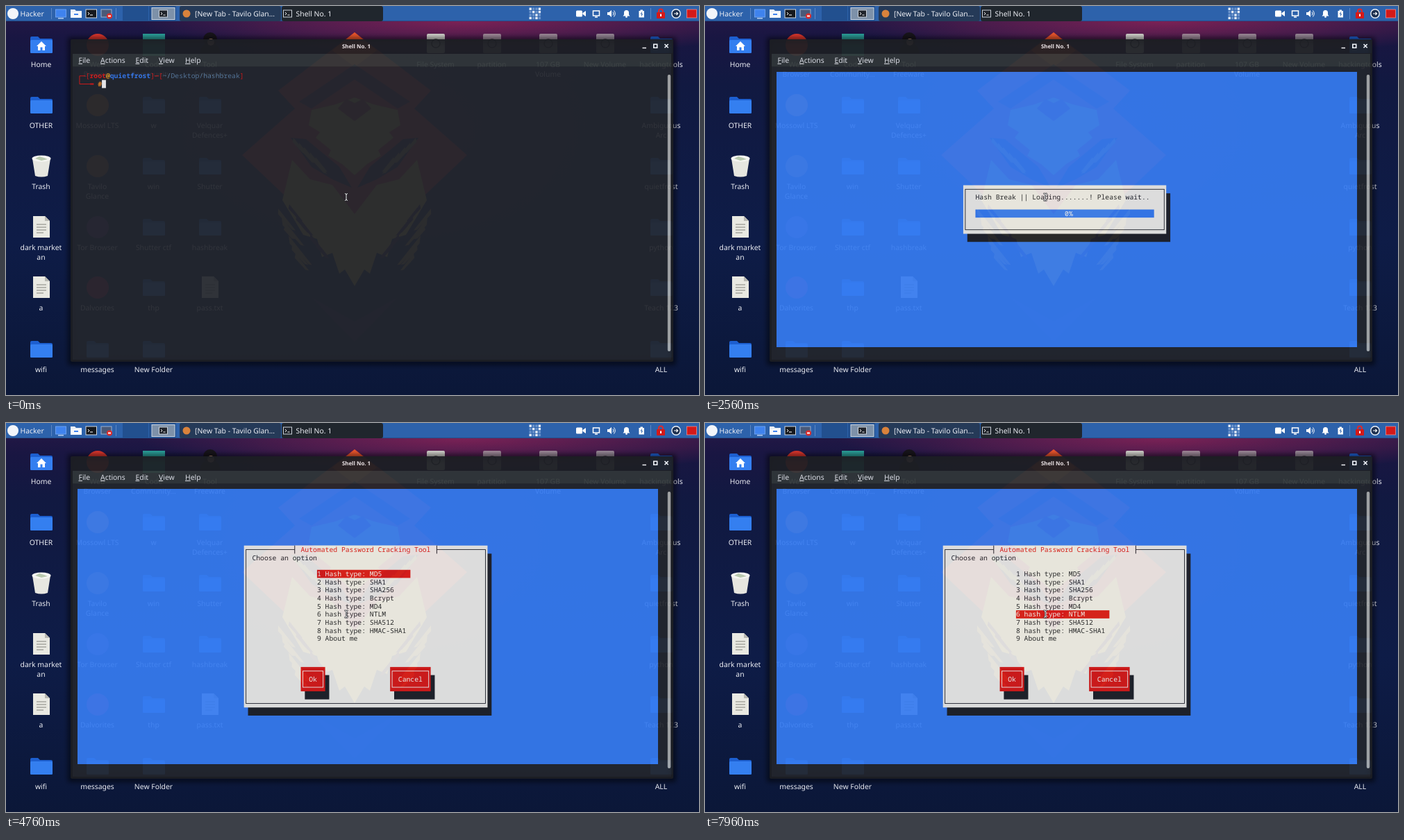
Animation, 998 px wide and 561 px high, one loop 8000 ms. Source, as an HTML page:

```html
<!DOCTYPE html>
<html lang="en">
<head>
<meta charset="utf-8">
<title>Desktop terminal session</title>
<style>
  html, body { margin: 0; width: 100%; height: 100%; overflow: hidden; background: #0c1638; }
  svg { display: block; width: 100vw; height: 100vh; }
  text { font: 10.4px "Noto Sans", sans-serif; fill: #eceef4; text-rendering: geometricPrecision; white-space: pre; }
  .label { text-anchor: middle; }
  .title { font-size: 7.9px; font-weight: 700; text-anchor: middle; }
  .mono { font: 9.743px "Noto Sans Mono", monospace; }
  .bold { font-weight: 700; }
</style>
</head>
<body>
<svg id="stage" viewBox="0 0 998 561">
  <defs>
    <linearGradient id="sky" x2="0" y2="1">
      <stop offset="0" stop-color="#281847"/>
      <stop offset=".08" stop-color="#191642"/>
      <stop offset=".2" stop-color="#111941"/>
      <stop offset=".6" stop-color="#0e1c47"/>
      <stop offset="1" stop-color="#0b1738"/>
    </linearGradient>
    <radialGradient id="glow">
      <stop offset="0" stop-color="#8a2358" stop-opacity=".85"/>
      <stop offset="1" stop-color="#8a2358" stop-opacity="0"/>
    </radialGradient>
    <filter id="blur"><feGaussianBlur stdDeviation="3.5"/></filter>
    <clipPath id="taskClip"><path d="M250 0H396V22H250z"/></clipPath>
    <path id="beam" d="M488.3 270.5Q490 270.5 490 272V279Q490 280.5 488.3 280.5M491.7 270.5Q490 270.5 490 272M490 279Q490 280.5 491.7 280.5"/>
  </defs>
  <g id="wallpaper"></g>
  <g id="desktop"></g>
  <g id="panel"></g>
  <rect x="93" y="49" width="868" height="465" fill="none" stroke="#000" stroke-opacity=".6" stroke-width="7" filter="url(#blur)"/>
  <g opacity=".93"><g id="window"></g><g id="screen"></g></g>
  <g fill="none" stroke-linecap="round">
    <use href="#beam" stroke="#1b1d22" stroke-width="2.2"/>
    <use href="#beam" stroke="#eee"/>
  </g>
</svg>
<script>
const CELL_W = 836 / 143, CELL_H = 397 / 34;
const BLUE = '#367bf0', RED = '#d81a18', INK = '#1f2229', PAPER = '#ebebe8', WHITE = '#f4f4f4';
const $ = id => document.getElementById(id);

const rect = (x, y, w, h, fill, more = '') =>
  `<rect x="${x}" y="${y}" width="${w}" height="${h}" fill="${fill}" ${more}/>`;
const path = (d, fill, more = '') => `<path d="${d}" fill="${fill}" ${more}/>`;
const line = (d, stroke, width = 1) => path(d, 'none', `stroke="${stroke}" stroke-width="${width}"`);
const circle = (x, y, r, fill, more = '') => `<circle cx="${x}" cy="${y}" r="${r}" fill="${fill}" ${more}/>`;
const text = (x, y, s, more = '') => `<text x="${x}" y="${y}" ${more}>${s}</text>`;
const at = (x, y, body) => `<g transform="translate(${x} ${y})">${body}</g>`;

// A fan of slanted brush strokes, each one shifted by (dx, dy) from the last.
function strokes(count, x, y, dx, dy, length, color) {
  let d = '';
  for (let i = 0; i < count; i++) {
    const reach = length * (.7 + .3 * Math.sin(i * 2.4));
    d += `M${x + i * dx} ${y + i * dy}l${reach * .62} ${reach * .78} -5 -1 ${-reach * .5} ${-reach * .55}z`;
  }
  return path(d, color);
}

// Wallpaper: the left half of each shape is given, the right half is mirrored.
function drawWallpaper() {
  const half =
    path('M502 38L392 122 416 148 340 215 400 272 412 236 436 262 502 300z', '#a82f33') +
    path('M502 38L470 64 502 88z', '#e8552c') +
    path('M502 84L422 138 440 148 502 106z', '#4a1d45') +
    path('M502 132L474 142 440 150 436 172 452 182 446 190 468 208 464 216 484 228 502 244z', '#b5983c') +
    path('M502 140L490 134 478 148 502 166z', '#8a2f3b') +
    path('M410 190L432 192 480 232 498 262 470 250 440 232z', '#2a1a44') +
    path('M412 222L438 250 470 258 502 300V404L488 380 480 386 470 356 455 362 448 336 428 330 398 280z', '#b89c42') +
    strokes(5, 414, 190, 8, 7, 42, '#8d7a40') +
    strokes(6, 392, 292, 5, 13, 58, '#a07c40') +
    strokes(5, 408, 286, 10, 14, 44, '#3a1d48') +
    path('M440 420L502 455V484L470 452z', '#23214f');
  $('wallpaper').innerHTML = rect(0, 0, 998, 561, 'url(#sky)') +
    '<ellipse cx="660" cy="22" rx="470" ry="50" fill="url(#glow)"/>' +
    '<ellipse cx="540" cy="180" rx="330" ry="200" fill="url(#glow)" opacity=".3"/>' +
    half + `<g transform="matrix(-1 0 0 1 1004 0)">${half}</g>`;
}

const icons = {
  folder: path('M-16 -10q0 -2 2 -2h9l3 3h16q2 0 2 2v17q0 2 -2 2h-28q-2 0 -2 -2z', '#1d5fd0') +
    rect(-16, -7, 32, 19, '#347ff0', 'rx="1.5"'),
  doc: path('M-12 -16H5L12 -9V15H-12z', '#e9e9e2') + path('M5 -16V-9H12z', '#b9b9b2') +
    line('M-7 -4H7M-7 0H7M-7 4H7M-7 8H3', '#a5a59f', 1.4),
  trash: path('M-13 -11L-9 14Q0 17 9 14L13 -11z', '#e6e6e0') +
    '<ellipse cy="-11" rx="13.5" ry="4.5" fill="#f6f6f2"/>' +
    path('M-9 -11L-3 -14 4 -12 9 -10 0 -8z', '#b9c9ae'),
  drive: rect(-13, -16, 26, 28, '#cfcfc9', 'rx="2"') + circle(0, -2, 6, 'none', 'stroke="#444" stroke-width="1.5"'),
  silhouette: circle(0, -8, 10, '#17141a') + path('M-15 12Q-12 -3 0 -3T15 12z', '#17141a') + circle(1, -4, 5, '#b98d78'),
};
icons.home = icons.folder + path('M0 -5L-7 2H-5V8H-1.5V3.5H1.5V8H5V2H7z', '#fff');
const disc = color => circle(0, 0, 16, color);

function drawDesktop() {
  const columns = [51, 132, 213, 294, 619, 700, 781, 863, 944];
  const iconRows = [56, 143, 231, 319, 406, 495];
  const labelRows = [88, 176, 264, 352, 439, 527.5];
  const items = [
    [0, 0, icons.home, 'Home'], [0, 1, icons.folder, 'OTHER'], [0, 2, icons.trash, 'Trash'],
    [0, 3, icons.doc, 'dark market', 'an'], [0, 4, icons.doc, 'a'], [0, 5, icons.folder, 'wifi'],
    [1, 0, disc('#d8352c'), 'Web', 'Browser'], [1, 1, disc('#b0602c'), 'Mossowl LTS'],
    [1, 2, disc('#8a5a3a'), 'Tavilo', 'Glance'], [1, 3, disc('#5a3478'), 'Tor Browser'],
    [1, 4, disc('#9c1c50'), 'Dalvorites'], [1, 5, icons.folder, 'messages'],
    [2, 0, rect(-16, -16, 32, 32, '#2a9d98'), 'Code', 'Community...'], [2, 1, icons.folder, 'w'],
    [2, 2, icons.folder, 'win'], [2, 3, icons.folder, 'Shutter ctf'], [2, 4, icons.folder, 'thp'],
    [2, 5, icons.folder, 'New Folder'],
    [3, 0, icons.silhouette, 'Tool', 'Freeware'], [3, 1, icons.folder, 'Velquar', 'Defences+'],
    [3, 2, icons.folder, 'Shutter'], [3, 3, icons.folder, 'hashbreak'], [3, 4, icons.doc, 'pass.txt'],
    [4, 0, icons.drive, 'File System'], [5, 0, icons.drive, 'partition'],
    [6, 0, icons.drive, '107 GB', 'Volume'], [7, 0, icons.drive, 'New Volume'],
    [8, 0, icons.folder, 'hackingtools'], [8, 1, icons.folder, 'Ambiguous', 'Arc'],
    [8, 2, icons.folder, 'quietfrost'], [8, 3, icons.folder, 'python'],
    [8, 4, icons.folder, 'Teach 123'], [8, 5, icons.folder, 'ALL'],
  ];
  $('desktop').innerHTML = items.map(([c, r, icon, ...lines]) => {
    const x = columns[c], unmounted = c > 4 && c < 8;
    return `<g opacity="${unmounted ? .6 : 1}">${at(x, iconRows[r], icon)}</g>` +
      lines.map((s, i) => text(x - .5, labelRows[r] + i * 14, s, 'class="label"')).join('');
  }).join('');
}

function drawPanel() {
  const terminal = rect(-6, -5, 12, 10, '#20242b', 'stroke="#c9d0d8"') + line('M-3.5 -2L-1.5 0L-3.5 2M0 2H3', '#eee');
  let dots = '';
  for (let i = 0; i < 16; i++) {
    const x = i % 4, y = i >> 2;
    dots += rect(753.5 + x * 4.4, 2.5 + y * 4.4, 3.4, 3.4, (x * 3 + y * 5) % 7 < 3 ? '#e6edf7' : '#6b93cb');
  }
  $('panel').innerHTML = rect(0, 0, 998, 22, '#2d62ab') + rect(0, 21, 998, 1, '#234f8c') +
    circle(10, 11, 8, '#f2f5fa') + text(20.5, 14.8, 'Hacker') +
    line('M65.5 3V19M158.5 3V19M928.5 3V19', '#5d88c4') +
    rect(71.5, 5, 15, 11, '#3f83ee', 'stroke="#79aaf4" stroke-width=".8"') + rect(75, 17, 8, 1.5, '#b5cdf0') +
    path('M93 5H99L101 7H109V17H93z', '#e9eef6') + rect(93, 9, 16, 8, '#f7f9fc') + rect(98, 11, 6, 2, '#3f83ee') +
    rect(115, 5, 15.5, 12, '#15181d', 'stroke="#d2d6dc"') + line('M118 9L120 11L118 13M121 13H125', '#fff') +
    rect(137, 5, 15, 11, '#4a5a78', 'stroke="#9bb0d0"') + circle(149, 14.5, 4, '#db2b2b') + rect(147, 13.5, 4, 2, '#fff') +
    rect(168, 0, 37, 22, '#22508f') + rect(206, 0, 39, 22, '#22508f') +
    rect(210, 2.5, 33, 17, '#7d91a9', 'stroke="#c9d4e2"') + at(226.5, 11, terminal) +
    rect(250, 0, 146, 22, '#253a58', 'rx="3"') + rect(397, 0, 146, 22, '#20262d', 'rx="3"') +
    circle(260, 11, 5.5, '#d9823c') +
    `<g clip-path="url(#taskClip)">${text(272, 14.8, '[New Tab - Tavilo Glan...')}</g>` +
    at(405.5, 11, terminal) + text(417.5, 14.8, 'Shell No. 1') + dots +
    rect(821, 6.5, 9, 9, '#fff', 'rx="1.5"') + path('M830.5 10L835 7V15L830.5 12z', '#fff') +
    line('M845.5 7H854.5V14H845.5zM848 16H852', '#fff', 1.5) +
    path('M866 9H868.5L872 6V16L868.5 13H866z', '#fff') + line('M874 8.5Q876 11 874 13.5M875.5 6.5Q879 11 875.5 15.5', '#fff') +
    path('M888.5 14.5L890 12.5V9.5Q890 6 893.5 6T897 9.5V12.5L898.5 14.5z', '#fff') + circle(893.5, 15.5, 1.4, '#fff') +
    path('M911.5 7H913.5V5.5H917V7H919V16.5H911.5z', '#fff') + line('M915.8 8.5L914.3 11.5H916.5L915 14.5', '#2d62ab') +
    line('M940 10V7.5Q940 4.5 943 4.5T946 7.5V10', '#e02a2a', 2) + rect(937, 9, 12, 9, '#d41919', 'rx="1"') + rect(942, 11.5, 2, 3.5, '#fff') +
    circle(965, 11, 6.2, '#1d3050', 'stroke="#eef2f8" stroke-width="1.4"') + line('M962 11H967.5M965.5 9L967.5 11L965.5 13', '#fff', 1.2) +
    rect(980.5, 5, 14, 12, '#d41919', 'stroke="#f08a8a" stroke-width=".8"');
}

function drawWindow() {
  const entries = [['File', 104.5], ['Actions', 136], ['Edit', 186.5], ['View', 220], ['Help', 258]];
  $('window').innerHTML = rect(93, 48, 868, 465, '#1d1f24', 'rx="2"') + rect(96, 88, 862, 422, '#23262d') +
    rect(96, 69, 862, 18.5, '#313739') +
    text(504.5, 60.5, 'Shell No. 1', 'class="title"') +
    line('M916.5 60.5H922M932.8 55.3H937.7V60.2H932.8z', '#fff', 1.6) + line('M948.5 55L953.7 60.2M953.7 55L948.5 60.2', '#fff', 1.6) +
    entries.map(([s, x]) => text(x, 81.8, `<tspan text-decoration="underline">${s[0]}</tspan>${s.slice(1)}`)).join('') +
    rect(952.8, 99, 4.4, 399, '#a9abab', 'rx="2"');
}

// Terminal helpers work in character cells.
const px = c => 103 + c * CELL_W, py = r => 95 + r * CELL_H;
const cells = (c, r, w, h, fill) => rect(px(c), py(r), w * CELL_W, h * CELL_H, fill);
const print = (c, r, s, fill, bold = '') =>
  text(px(c), py(r) + 9.1, s, `class="mono ${bold}" style="fill:${fill}"`);
const frame = (c, r, w, h, stroke) =>
  rect(px(c + .5), py(r + .5), (w - 1) * CELL_W, (h - 1) * CELL_H, 'none', `stroke="${stroke}" stroke-width=".9"`);
const box = (c, r, w, h, fill, stroke) =>
  cells(c + 1, r + 1, w, h, INK) + cells(c, r, w, h, fill) + frame(c, r, w, h, stroke);
const backdrop = cells(0, 0, 143, 34, BLUE);

const blank = () => cells(0, 0, 1, 1, WHITE);

function prompt(typed) {
  const y0 = py(.5), y1 = py(1.5);
  return line(`M${px(2)} ${y0}H${px(.5)}V${y1}H${px(3.2)}M${px(19)} ${y0}H${px(20)}`, RED) +
    line(`M${px(3.1)} ${y1}H${px(4)}`, RED, 2) +
    print(2, 0, '[', RED) + print(3, 0, 'root', RED, 'bold') + print(7, 0, '@', '#f0a020', 'bold') +
    print(8, 0, 'quietfrost', BLUE, 'bold') + print(18, 0, ']', RED) + print(20, 0, '[', RED) +
    print(21, 0, '~/Desktop/hashbreak', '#587a9c') + print(40, 0, ']', RED) +
    print(5, 1, '#', '#f08a24', 'bold') + print(6, 1, typed, WHITE) + cells(6 + typed.length, 1, 1, 1, WHITE);
}

function gauge(percent) {
  return backdrop + box(46, 14, 50, 6, PAPER, INK) +
    print(49, 15, 'Hash Break || Loading.......! Please wait..', INK) +
    cells(49, 17, 44, 1, BLUE) + cells(49, 17, Math.floor(44 * percent / 100), 1, RED) +
    print(percent < 10 ? 71 : 70, 17, percent + '%', WHITE);
}

const options = ['Hash type: MD5', 'Hash type: SHA1', 'Hash type: SHA256', 'Hash type: Bcrypt', 'Hash type: MD4',
  'hash type: NTLM', 'Hash type: SHA512', 'hash type: HMAC-SHA1', 'About me'];

function menu(selected) {
  const button = (c, w, s) => box(c, 22, w, 3, RED, WHITE) + print(c + 2, 23, s, WHITE);
  return backdrop + box(41, 7, 60, 20, PAPER, INK) + cells(53.5, 7, 35, 1, PAPER) +
    line(`M${px(53.5)} ${py(7)}v${CELL_H}M${px(88.5)} ${py(7)}v${CELL_H}`, INK) +
    print(55, 7, 'Automated Password Cracking Tool', RED) + print(43, 8, 'Choose an option', INK) +
    options.map((s, i) => {
      const active = i + 1 === selected;
      return (active ? cells(59, 10 + i, 23, 1, RED) : '') + print(59, 10 + i, `${i + 1} ${s}`, active ? WHITE : INK);
    }).join('') + button(55, 6, 'Ok') + button(77, 10, 'Cancel');
}

const command = './hashbreak.sh ';
const keyTimes = [500, 630, 960, 1160, 1360];
const gaugeTimes = [2700, 2830, 2900, 3030, 3100, 3230, 3300, 3430, 3560, 3630, 3760, 3830, 3960,
  4100, 4160, 4300, 4360, 4500, 4560];
const downTimes = [6100, 6300, 6430, 6560, 6700, 6830, 7030, 7160];
const upTimes = [7560, 7700, 7900];
const passed = (times, t) => times.filter(time => time <= t).length;

function screenAt(t) {
  if (t < 2500) return prompt(t < 1500 ? command.slice(0, passed(keyTimes, t)) : command);
  if (t < 2560) return blank();
  if (t < 4700) return gauge(5 * passed(gaugeTimes, t));
  if (t < 4760) return blank();
  return menu(1 + passed(downTimes, t) - passed(upTimes, t));
}

let shown = '';
function tick() {
  const next = screenAt(performance.now() % 8000);
  if (next !== shown) $('screen').innerHTML = shown = next;
  requestAnimationFrame(tick);
}

drawWallpaper();
drawDesktop();
drawPanel();
drawWindow();
tick();
</script>
</body>
</html>
```
